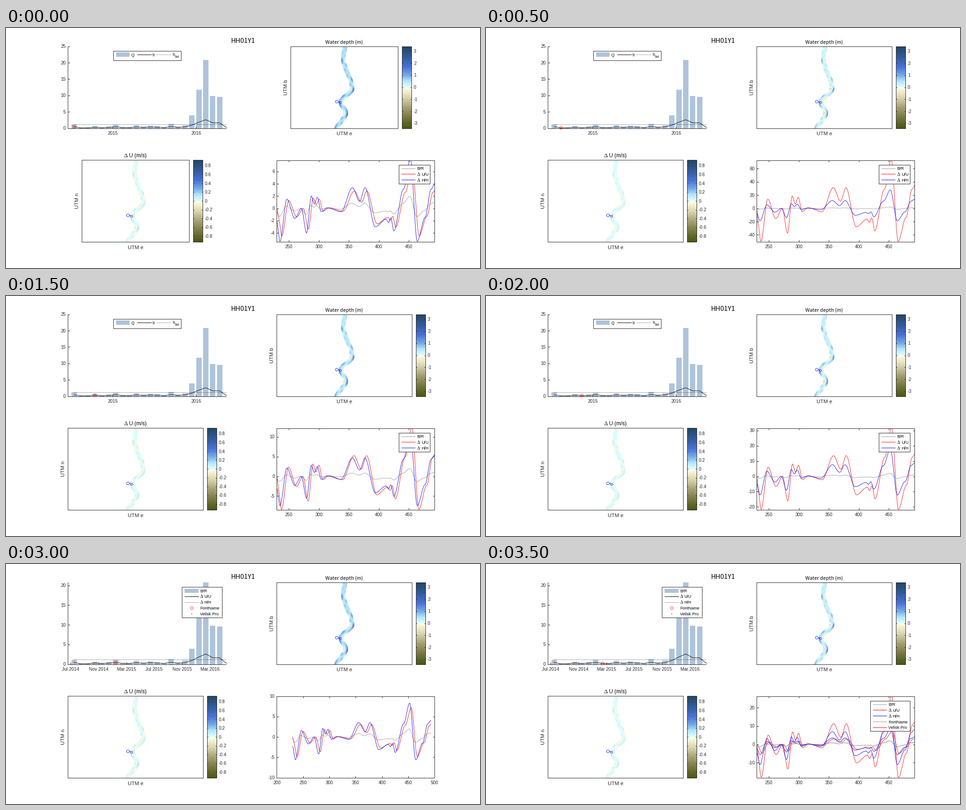
Recreate the animation shown at these times as a matplotlib script. Size 1051 px wide and 533 px high, loop 4 s.

```python
import numpy as np
import matplotlib.pyplot as plt
from matplotlib.animation import FuncAnimation
from matplotlib.colors import LinearSegmentedColormap
from matplotlib.patches import Circle, Rectangle

W, H, DPI = 1051, 533, 100
PX = 72 / DPI
INK, BAR, RED, BLUE, GRAY = "#262626", "#aec4da", "#ff0000", "#0000ff", "#969696"
SANS, HUMANIST, SERIF = "Liberation Sans", "Noto Sans CJK JP", "Liberation Serif"
NAMES = ["B/R", "Δ U/U", "Δ H/H", "FontName", "Velisk Pro"]

# Monthly river stage; discharge follows from it by a rating curve
STAGE = np.array([.45, .12, .14, .32, .19, .27, .43, .21, .2, .38, .25, .36,
                  .3, .2, .5, .25, .4, .95, 1.84, 2.6, 1.65, 1.63, .2])
DISCHARGE = 4.26 * STAGE ** 1.66
BANKFULL = 1.15

# Shallow water responds more strongly and with a shorter lag
U_GAIN = .84 * (STAGE / .45) ** -1.82
H_GAIN = 1.1 * U_GAIN ** .52
LAG = 3 * U_GAIN ** -.3

# Turning points: bed response along the river, and river course (y, x)
RESPONSE = [(230, -2.2), (235.3, -5.35), (246.8, 1.5), (260, -1.65), (271, 0),
            (279.6, -4), (287.5, 2), (292.5, .7), (297.5, 1.8), (304, -.55),
            (314, .1), (337, -.55), (356, 3.35), (368, 1.15), (377, 3.35),
            (394, -3), (412, -1.75), (416, -2.3), (420, -1.55), (425, -3.65),
            (441, 3.1), (452.5, 7.9), (464, -5.35), (477, -1.5), (487, 3.1), (493, 3.9)]
COURSE = [(34, 752), (66, 747.5), (134, 767), (164, 742), (188, 753), (226, 732)]

CMAP = LinearSegmentedColormap.from_list("depth", [
    (0, "#485812"), (.125, "#77773f"), (.25, "#a59f74"), (.375, "#dbd6b2"),
    (.5, "#ffffe6"), (.5, "#e0ffff"), (.575, "#b4e4fa"), (.65, "#73aae6"),
    (.75, "#4870d7"), (.875, "#325a96"), (1, "#244664")], N=512)


def through(turns, x):
    """Ease smoothly from each turning point to the next."""
    tx, ty = np.array(turns).T
    i = np.clip(np.searchsorted(tx, x) - 1, 0, len(tx) - 2)
    t = np.clip((x - tx[i]) / (tx[i + 1] - tx[i]), 0, 1)
    return ty[i] + (ty[i + 1] - ty[i]) * t * t * (3 - 2 * t)


def build_river(half=4.4):
    """Ribbon mesh with distance along it, offset across it and bend strength."""
    cy = np.arange(36, 226, .5)
    cx = through(COURSE, cy)
    dx, dy = np.gradient(cx), np.gradient(cy)
    ds = np.hypot(dx, dy)
    bend = np.tanh(np.gradient(np.arctan2(dy, dx)) / ds / .08)
    bend = np.convolve(bend, np.ones(9) / 9, "same")
    n = np.linspace(-1, 1, 9)
    x = cx[:, None] - (dy / ds)[:, None] * n * half
    y = cy[:, None] + (dx / ds)[:, None] * n * half
    return x, y, np.cumsum(ds)[:, None], n, bend[:, None]


RIVER_X, RIVER_Y, ALONG, ACROSS, BEND = build_river()
BARS = (np.sin(ALONG / 4.7) + np.sin(ALONG / 2.9 + 1)) * ACROSS
DISTANCE = np.linspace(230, 493, 700)

fig = plt.figure(figsize=(W / DPI, H / DPI), dpi=DPI, facecolor="white")
ax = fig.add_axes([0, 0, 1, 1])


def text(x, y, s, size=10, ha="left", font=SANS, color=INK, **kw):
    kw.setdefault("va", "baseline")
    ax.text(x, y, s, fontsize=size * PX, ha=ha, family=font, color=color, **kw)


def label(x, y, s, size=9.3):
    """Left-aligned text whose leading delta is set in serif."""
    if s.startswith("Δ"):
        text(x, y, "Δ", size * 1.08, font=SERIF, color="black")
        x, s = x + size, s[2:]
    text(x, y, s, size, color="black")


def clip_to(artist, x0, x1, y0, y1):
    artist.set_clip_path(Rectangle((x0, y0), x1 - x0, y1 - y0, transform=ax.transData))


def line(x, y, color=INK, lw=1, **kw):
    return ax.plot(x, y, color=color, lw=lw * PX, **kw)[0]


def dotted(x, y, **kw):
    line(x, [y, y], "black", ls=(0, (1, 2)), **kw)


def box(x0, x1, y0, y1, face="none", edge=INK):
    ax.add_patch(Rectangle((x0, y0), x1 - x0, y1 - y0, facecolor=face, edgecolor=edge,
                           lw=0 if edge == "none" else PX, zorder=2.5))


def ring(x, y, r, color):
    ax.add_patch(Circle((x, y), r, fill=False, edgecolor=color, lw=.8 * PX, zorder=3))


def dot(x, y):
    ax.add_patch(Circle((x, y), 1, facecolor=RED, lw=0, zorder=3))


def x_tick(x, y, inward=3.5):
    line([x, x], [y, y + inward])


def y_tick(x, y, inward=3.5):
    line([x, x + inward], [y, y])


def draw_discharge(k):
    late = k >= 6
    left, right, top, base = 137, 488, 40, 222
    scale = (base - top) / (DISCHARGE.max() if late else 25)
    xs = 150.5 + 15.37 * np.arange(len(STAGE))
    ys = base - STAGE * scale
    for x, q in zip(xs[:-1], DISCHARGE):
        box(x - 6, x + 6, base - q * scale, base, BAR, "none")
    line(xs, ys, "black", .9, zorder=2.6)
    dotted([150, right], base - BANKFULL * scale, zorder=2.6)

    line([left, left], [top, base])
    line([left, right], [base, base])
    for v in range(0, 21 if late else 26, 5):
        y_tick(left, base - v * scale)
        text(132, base - v * scale + 3.6, str(v), ha="right")
    if late:
        months = ["Jul 2014", "Nov 2014", "Mar 2015", "Jul 2015", "Nov 2015", "Mar 2016"]
        marks = [(143 + 61.7 * i, name) for i, name in enumerate(months)]
    else:
        marks = [(236, "2015"), (421, "2016")]
    for x, name in marks:
        x_tick(x, base, -3.5)
        text(x, 236.4, name, ha="center")

    for i in range(0 if late else k, k + 1):
        dot(xs[i], ys[i])
    ring(xs[k], ys[k], 3, RED)

    if late:
        box(390, 479, 50, 118, "white")
        rows = 58.8 + 12.8 * np.arange(5)
        box(396, 427, 54, 63, BAR, "none")
        line([396, 427], [rows[1]] * 2, "black", zorder=3)
        dotted([396, 427], rows[2], zorder=3)
        ring(411.5, rows[3], 3, RED)
        dot(411.5, rows[4])
        for y, name in zip(rows, NAMES):
            label(430, y + 3.3, name)
    else:
        box(238, 388, 50, 71, "white")
        box(244, 274, 53, 63, BAR, "none")
        line([291, 322], [58, 58], "black", zorder=3)
        dotted([334, 367], 58, zorder=3)
        label(277, 62, "Q")
        label(324, 62, "h")
        label(369, 61.5, "h")
        label(374, 65, "bkf", 7.2)


def draw_map(k, dx, dy, values, limit, step, ylabel):
    """River map and colour bar, moved by (dx, dy) from the upper map's place."""
    inset = 31 if k == 0 else 0
    left, right = 600 + dx + inset, 900 + dx - inset
    top, bottom = 40 + dy, 222 + dy
    mesh = ax.pcolormesh(RIVER_X + dx, RIVER_Y + dy, values, cmap=CMAP, vmin=-limit,
                         vmax=limit, shading="gouraud")
    clip_to(mesh, left, right, top, bottom)
    box(left, right, top, bottom)
    ring(733 + dx, 163 + dy, 3, BLUE)
    ring(741.5 + dx, 165 + dy, 2.2, BLUE)
    line([737 + dx, 739 + dx], [163.5 + dy, 164 + dy], BLUE, zorder=3)

    x0, x1 = right + 9, right + 30
    ax.pcolormesh([x0, x1], np.linspace(bottom, top, 182),
                  np.linspace(-1, 1, 181)[:, None], cmap=CMAP, vmin=-1, vmax=1)
    box(x0, x1, top, bottom)
    count = int(limit / step)
    for i in range(-count, count + 1):
        y = (top + bottom) / 2 - i * step / limit * (bottom - top) / 2
        y_tick(x0, y, 2)
        y_tick(x1, y, -2)
        text(x1 + 4.5, y + 3.6, f"{i * step:.2g}")
    text(left - 10.5, (top + bottom) / 2, ylabel, 11.5, "center", rotation=90, va="center")
    text(750 + dx, bottom + 15.7, "UTM e", 11.5, "center")


def draw_response(k):
    late = k == 6
    left, right, top, bottom = frame = 600, 950, 293, 474
    if late:
        (x_min, x_max), (y_min, y_max), first = (200, 500), (-10, 10), 200
    else:
        gain = max(U_GAIN[k], H_GAIN[k])
        (x_min, x_max), (y_min, y_max), first = (230, 493), (-5.4 * gain, 7.8 * gain), 250
    to_x = lambda v: left + (v - x_min) / (x_max - x_min) * (right - left)
    to_y = lambda v: bottom - (v - y_min) / (y_max - y_min) * (bottom - top)

    for j in ([6, 7] if k == 7 else [k]):
        onset = np.clip((DISTANCE - 230) / (1.3 * LAG[j]), 0, 1)
        curves = [(GRAY, .25 * through(RESPONSE, DISTANCE + .8)),
                  (RED, U_GAIN[j] * onset * through(RESPONSE, DISTANCE - LAG[j])),
                  (BLUE, H_GAIN[j] * through(RESPONSE, DISTANCE))]
        for color, v in curves:
            clip_to(line(to_x(DISTANCE), to_y(v), color, .85), *frame)

    box(*frame)
    for v in range(first, x_max + 1, 50):
        x_tick(to_x(v), bottom, -3.5)
        x_tick(to_x(v), top)
        text(to_x(v), 488.8, str(v), ha="center")
    step = next(s for s in (2, 5, 10, 20) if (y_max - y_min) / s < 8)
    for v in range(int(np.ceil(y_min / step)) * step, int(y_max) + 1, step):
        y_tick(left, to_y(v))
        y_tick(right, to_y(v), -3.5)
        text(595.5, to_y(v) + 3.6, str(v), ha="right")

    if not late:
        count, x0 = (5, 852) if k == 7 else (3, 871)
        box(x0, 940, 303, 307 + 12.7 * count, "white")
        for i, color in enumerate([GRAY, RED, BLUE, GRAY, RED][:count]):
            y = 311 + 12.8 * i
            line([x0 + 6, x0 + 36], [y, y], color, zorder=3)
            label(x0 + 40, y + 3.6, NAMES[i])


def draw(k):
    ax.clear()
    ax.axis("off")
    # Whole numbers land on pixel centres after line snapping
    ax.set_xlim(-.45, W - .45)
    ax.set_ylim(H - .55, -.55)

    text(525, 32.8, "HH01Y1", 14.8, "center", HUMANIST, "black")
    text(749.7, 34.8, "Water depth (m)", 11, "center", HUMANIST, "black")
    label(261, 286.8, "Δ U (m/s)", 11.8)

    draw_discharge(k)
    depth = .5 * U_GAIN[k] ** -.45 - 1.2 * BEND * ACROSS + .3 * BARS
    flow = .01 + U_GAIN[k] ** -.25 * (.04 * BARS - .1 * np.roll(BEND, 8, axis=0) * ACROSS)
    draw_map(k, 0, 0, depth, 3.4, 1, "UTM b")
    draw_map(k, -463, 252.5, flow, .93, .2, "UTM n")
    draw_response(k)
    return []


anim = FuncAnimation(fig, draw, frames=8, interval=500, init_func=lambda: [],
                     repeat=True, repeat_delay=0, blit=False)
plt.show()
```
